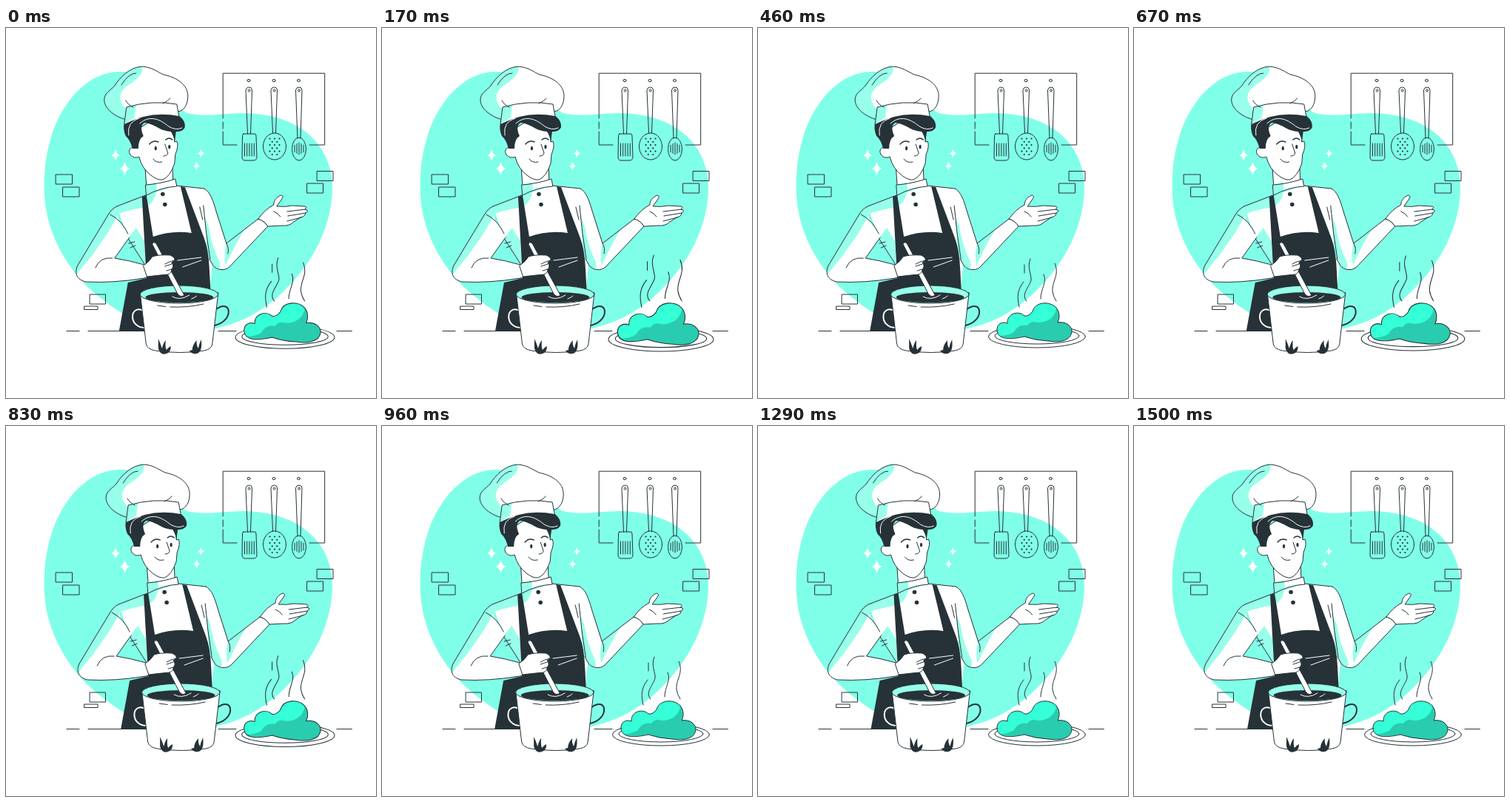
An HTML page with a canvas for the animation above (1540 ms loop, 500 by 500 pixels).

```html
<!DOCTYPE html>
<html lang="en">
<head>
<meta charset="utf-8">
<title>Chef</title>
<style>
  html, body { margin: 0; width: 100%; height: 100%; overflow: hidden; background: #fff; }
  canvas { display: block; width: 500px; height: 500px; }
</style>
</head>
<body>
<canvas id="stage"></canvas>
<script>
const INK = '#263238', MINT = '#80ffe8', SHADE = '#97ffea', LIGHT = '#34ffd6', TEAL = '#29ccae', WHITE = '#fff';
const LOOP = 1540, CYCLE = 1500, LEAD = 32, FPS = 24;

const canvas = document.getElementById('stage');
const ctx = canvas.getContext('2d');
const ratio = window.devicePixelRatio || 1;
canvas.width = canvas.height = 500 * ratio;

function shape(d, fill, stroke, width = 1) {
  const path = new Path2D(d);
  if (fill) { ctx.fillStyle = fill; ctx.fill(path); }
  if (stroke) { ctx.strokeStyle = stroke; ctx.lineWidth = width; ctx.stroke(path); }
}
const line = (d, color = INK, width = 1) => shape(d, null, color, width);

function oval(x, y, rx, ry, fill, stroke, width = 1) {
  ctx.beginPath();
  ctx.ellipse(x, y, rx, ry, 0, 0, 2 * Math.PI);
  if (fill) { ctx.fillStyle = fill; ctx.fill(); }
  if (stroke) { ctx.strokeStyle = stroke; ctx.lineWidth = width; ctx.stroke(); }
}

function brick(x, y, w, h) {
  ctx.strokeStyle = INK;
  ctx.lineWidth = 1;
  ctx.strokeRect(x, y, w, h);
}

function sparkle(x, y, rx, ry) {
  const a = rx * 0.2, b = ry * 0.2;
  shape(`M${x} ${y - ry}Q${x + a} ${y - b} ${x + rx} ${y}Q${x + a} ${y + b} ${x} ${y + ry}` +
    `Q${x - a} ${y + b} ${x - rx} ${y}Q${x - a} ${y - b} ${x} ${y - ry}Z`, WHITE);
}

function utensilHandle(x, bottom) {
  oval(x - 0.5, 71, 2, 1.7, null, INK);
  line(`M${x - 2} ${bottom}L${x - 4.5} 84Q${x - 4} 80 ${x} 80Q${x + 4} 80 ${x + 4} 84L${x + 2} ${bottom}`);
  oval(x, 84.5, 1.4, 1.6, null, INK);
}

function drawRack() {
  line('M293.2 122V61.2H430.7V158H410M293.2 127V136M293.2 140V158H312');
  utensilHandle(328.5, 143);
  line('M321 143H336Q338 143 338 146L339 174Q339 179 334 179H323Q319 179 319 174L319.5 146Q319.5 143 321 143Z');
  for (let x = 322.5; x < 337; x += 3.2) line(`M${x} 156V173`);

  utensilHandle(362.5, 142);
  oval(363, 160, 15.5, 18, null, INK);
  for (let row = 0; row < 6; row++) {
    const count = row % 2 ? 2 : 3;
    for (let i = 0; i < count; i++)
      oval(363 + (i - (count - 1) / 2) * 6.5, 149.5 + row * 4.3, 1.1, 1.1, INK);
  }

  utensilHandle(396, 149);
  oval(396, 163.5, 9.5, 15.5, null, INK);
  for (let i = -2; i <= 2; i++) {
    const half = 8 - Math.abs(i) * 1.6;
    line(`M${396 + i * 3} ${163 - half}v${half * 2}`);
  }
}

function drawRoom() {
  shape('M155 59C112 58 77 98 62 144C51 178 50 210 53 238C59 284 84 326 116 355C150 384 190 411 235 411' +
    'C300 411 343 387 374 357C417 316 441 265 441 215C441 165 405 116 320 115C295 115 270 121 245 115' +
    'C225 108 215 59 155 59Z', MINT);
  sparkle(148, 172, 6, 7.5);
  sparkle(160.5, 190, 7, 9);
  sparkle(263.5, 169.5, 4.5, 5.5);
  sparkle(257.5, 186.5, 4.5, 6);
  brick(67.5, 198, 22, 13);
  brick(77, 215, 22, 13);
  brick(113.5, 360, 21, 13);
  brick(106, 376, 18, 4.5);
  brick(420.5, 193.5, 21.5, 13);
  brick(407, 210, 21.5, 13);
  drawRack();
  line('M82 409.5H99M111 409.5H190M287 409.5H311M447 409.5H467.5');
}

function drawTorso() {
  shape('M188 185L190 214Q208 220 226 208L225 185Z', WHITE, INK);
  shape('M190 226L150 241L165 284L189 321L190 360H275L279 320L268 217L230 213Z', WHITE);
  shape('M189 226L150 241L143 254Q165 246 184 243Q206 238 203 209L189 212Z', SHADE);
  shape('M165 284L189 321L187 288L176 270Z', SHADE);
  line('M189 226L150 241M230 213L268 217M165 284L188 320');

  // Raised arm and open palm
  shape('M268 217C276 221 280 233 284 247L298 291L341 258Q349 260 354 268L302 323C295 329 285 327 280 321' +
    'L275 312L262 240Z', WHITE);
  shape('M269 256L272 303Q276 321 287 325Q292 325 288 314Q278 295 274 268Z', SHADE);
  shape('M298 291L322 273Q308 296 297 321Q294 304 298 291Z', SHADE);
  line('M268 217C276 221 280 233 284 247L298 291L341 258Q349 260 354 268L302 323C295 329 285 327 280 321L275 312' +
    'M262 242L266 259M267 240Q270 276 276 312M298 291Q302 297 300 305');
  shape('M341 258Q350 245 362 239C362 232 367 228 372 226Q376 227 373 231L366 241Q378 242 387 240L404 241' +
    'Q408 242 404 245L407 246Q409 248 405 250L404 253Q403 255 398 256L389 262Q383 268 373 267L354 268Q349 260 341 258Z',
    WHITE, INK);
  line('M405 245L380 248M405 250L381 254M399 256L380 261M362 248Q368 250 371 255');

  shape('M184 228L190 226L199 282Q225 273 251 277L236 214L242 215L268 284Q274 300 275 325L277 362H188V409.5H153' +
    'L165 344L190 338Z', INK);
  shape('M189 212Q207 211 229 204L231 214Q210 215 190 226Z', WHITE);
  shape('M189 212L202 209Q205 215 203 221L190 226Z', SHADE);
  line('M189 212Q207 211 229 204L231 214Q210 215 190 226Z');
  oval(212, 224.5, 2.8, 2.8, INK);
  oval(215, 238.5, 2.8, 2.8, INK);
  line('M232 314L264 310M239 323L264 314', WHITE);
}

function drawStirringArm() {
  const edge = 'M150 241Q142 245 138 253L118 286L97 321C92 332 96 340 108 343Q145 345 187 338L192 336L187 320' +
    'Q166 314 147 311L167 283';
  shape(edge + 'L152 258Z', WHITE);
  shape('M150 241Q142 245 138 253L118 286L97 321Q94 328 96 333Q104 322 116 308L137 278L153 251Z', SHADE);
  line(edge);
  line('M141 252Q157 260 165 278M121 324Q127 309 144 311M166 291L174 289M168 297L175 294');
}

function drawHead() {
  shape('M179 137L178 162C170 159 164 164 168 171C171 175 176 176 180 174Q184 190 196 199Q205 206 212 205' +
    'Q222 201 228 183L229 171Q234 159 231 153L228 154V136L205 120Z', WHITE, INK);
  shape('M160 128C163 117 192 108 222 114C237 117 243 126 242 134C240 139 235 140 230 140L228 154Q227 146 223 140' +
    'Q214 139 208 136Q194 128 187 128Q180 133 186 146Q179 150 179 163L171 163Q168 151 162 146Q158 137 160 128Z', INK);
  line('M166 145Q163 127 180 122M181 129C194 117 208 123 220 133Q230 139 238 135', WHITE);
  oval(202.5, 162.5, 1.6, 2.8, INK);
  oval(221, 160.5, 1.6, 2.8, INK);
  line('M194 157Q199 151 206 154M216 151Q221 147 225 151', INK, 1.5);
  line('M215 157L219 169Q218 173 213 173M199 177Q203 183 211 181');

  const puffLeft = 'M163 124C147 120 133 109 133 97C133 88 141 85 147 78C154 67 167 53 184 52';
  const puff = puffLeft + 'C198 53 204 59 213 63C232 67 246 77 246 92C246 103 241 112 233 113';
  shape(puff + 'Q198 108 163 124Z', WHITE);
  shape(puffLeft + 'C187 61 178 69 164 78C151 88 153 100 162 109Z', SHADE);
  line(puff);
  shape('M163 107Q198 97 231 103L234 119Q195 111 160 130Z', WHITE);
  shape('M163 107L176 104L174 121L160 130Z', SHADE);
  line('M160 130L163 107Q198 97 231 103L234 119');
  line('M162 98Q165 104 172 107M222 95Q219 99 212 102M156 77Q166 61 176 61');
}

function drawPot() {
  line('M186 382C167 373 165 405 188 405', WHITE, 2);
  line('M284 380C305 365 309 396 282 402', INK, 2);
  shape('M181.5 358L189.5 427Q191 434 202 436Q236 441 268 436Q278 434 279 427L287 358Z', WHITE, INK);
  oval(234.2, 360, 52.8, 12, SHADE, INK);
  oval(234.5, 364, 46, 7, INK);
  line('M225 363Q235 369 248 361M251 366Q256 364 258 362', WHITE);
  shape('M198 292Q199 288 203 291L241 361Q236 365 232 359Z', WHITE, INK);
  shape('M186 321Q194 316 198 309Q207 306 222 307Q229 310 228 314L224 317Q228 322 224 326Q224 331 219 333' +
    'Q207 334 191 336Z', WHITE, INK);
  line('M228 314Q219 316 215 319M224 326L217 328M224 319L215 322');
  line('M205 375L216 376.5M222 377Q246 378 267 373');
  shape('M206 420Q209 426 211 433Q213 425 216 422Q215 431 217 435Q220 431 223 430Q223 438 217 440' +
    'Q209 443 206 433Z', INK);
  shape('M264 421Q261 427 260 433Q257 428 258 422Q252 428 252 435L248 436Q251 441 258 440Q266 438 264 421Z', INK);
}

function drawChef() {
  drawTorso();
  drawStirringArm();
  drawHead();
  drawPot();
}

function drawMeal() {
  oval(377, 417, 65.5, 15, WHITE, INK);
  oval(377, 416, 57, 11, WHITE, INK);
  const right = 'C408 384 408 392 405 398C416 396 425 403 424 411C422 424 405 425 392 423Q374 422 360 417';
  const food = 'M323 409C322 400 330 396 337 399C336 386 352 381 360 389Q366 390 371 383C375 369 395 369 403 378' +
    right + 'C342 421 324 422 323 409Z';
  shape(food, LIGHT);
  shape('M326 416Q338 416 346 411Q351 400 364 402Q369 395 377 398C389 399 402 392 403 378' +
    right + 'Q336 421 326 416Z', TEAL);
  line(food);
  line('M360 320L360 331M359 343C350 354 350 364 353 377');
  line('M368 312C363 324 370 333 369 341C366 351 355 360 363 369');
  line('M386 333C391 344 382 352 382 366');
  line('M401 318C408 334 397 342 398 356Q399 363 403 369');
}

// Linear interpolation over [progress, value] stops
function along(stops, p) {
  const i = Math.max(1, stops.findIndex(([at]) => at >= p));
  const [p0, v0] = stops[i - 1], [p1, v1] = stops[i];
  return v0 + (v1 - v0) * (p - p0) / (p1 - p0);
}

const shake = [0, -1, 2, -4, 4, -4, 4, -4, 2, -1, 0].map((v, i) => [i / 10, v]);
const heartbeat = [[0, 1], [0.1, 1.1], [0.3, 1], [0.4, 1], [0.5, 1.1], [0.6, 1], [1, 1]];

function render(now) {
  const step = Math.floor((now % LOOP + 4) * FPS / 1000);
  const p = Math.min(1, (Math.min(step, 36) * 1000 / FPS + LEAD) / CYCLE);

  ctx.setTransform(ratio, 0, 0, ratio, 0, 0);
  ctx.fillStyle = WHITE;
  ctx.fillRect(0, 0, 500, 500);
  ctx.lineCap = ctx.lineJoin = 'round';
  drawRoom();

  ctx.save();
  ctx.translate(along(shake, p), 0);
  drawChef();
  ctx.restore();

  ctx.save();
  const scale = along(heartbeat, p);
  ctx.translate(377, 372);
  ctx.scale(scale, scale);
  ctx.translate(-377, -372);
  drawMeal();
  ctx.restore();
}

const start = performance.now();
function tick() {
  render(performance.now() - start);
  requestAnimationFrame(tick);
}
tick();
</script>
</body>
</html>
```
